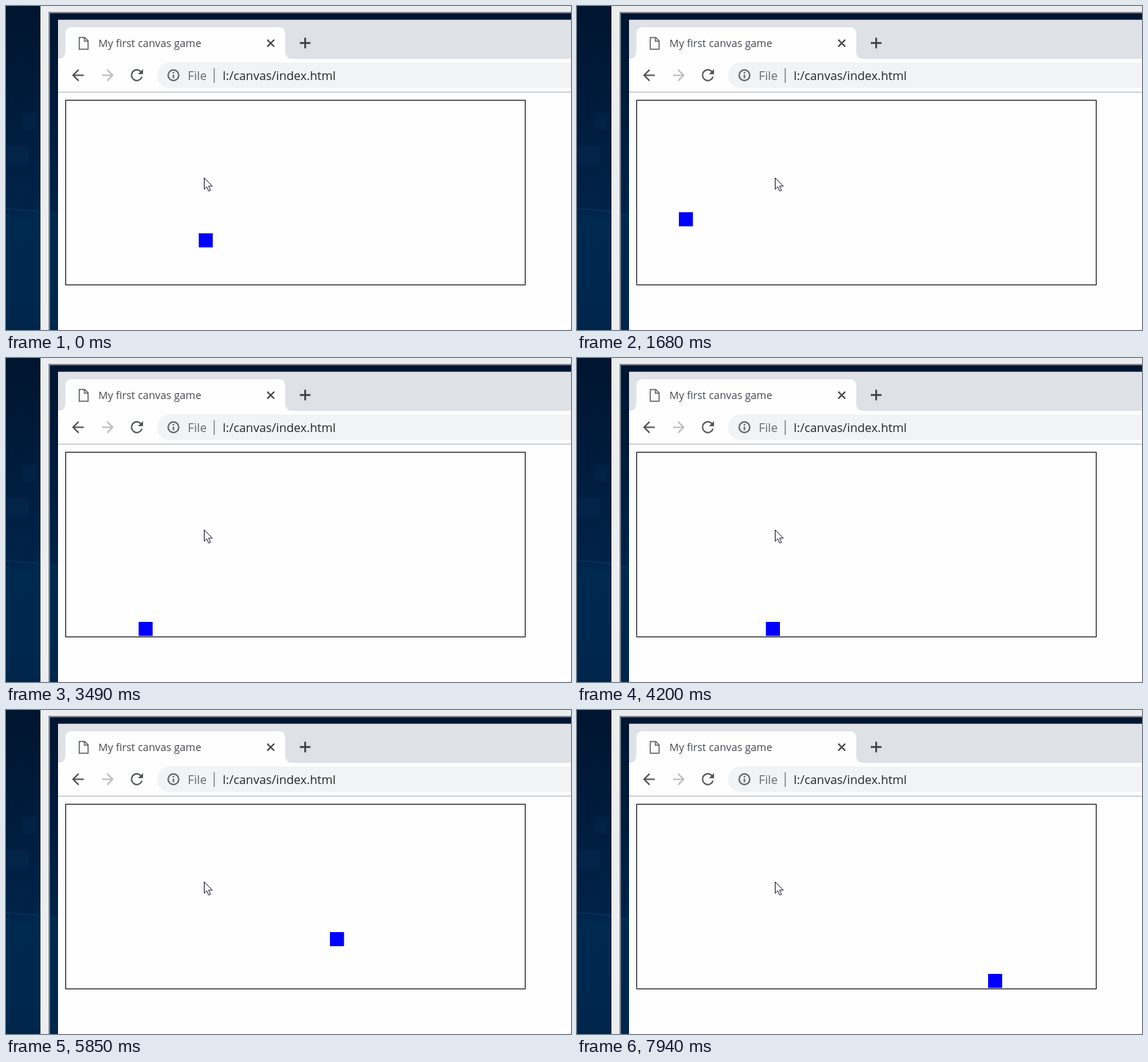
Animation, 771 px wide and 442 px high, one loop 8000 ms. Source, as an HTML page:

```html
<!DOCTYPE html>
<html lang="en">
<head>
<meta charset="utf-8">
<title>Canvas game</title>
<style>
  html, body { margin: 0; width: 100%; height: 100%; overflow: hidden; background: #fff; }
  svg { display: block; }
  text { font-family: "Open Sans", "Noto Sans", sans-serif; }
  .icon { fill: none; stroke: #5f6368; stroke-width: 2; }
</style>
</head>
<body>
<svg width="771" height="442" viewBox="0 0 771 442">
  <defs>
    <linearGradient id="night" x2="0" y2="1">
      <stop offset="0" stop-color="#001530"/>
      <stop offset=".3" stop-color="#001b3b"/>
      <stop offset=".62" stop-color="#002348"/>
      <stop offset=".66" stop-color="#00294f"/>
      <stop offset="1" stop-color="#00264c"/>
    </linearGradient>
  </defs>

  <!-- desktop and outer window frame -->
  <rect width="771" height="442" fill="url(#night)"/>
  <g fill="#08305a" opacity=".3">
    <rect x="2" y="191" width="29" height="27"/>
    <rect x="23" y="146" width="18" height="22"/>
  </g>
  <path d="M0 277Q40 277 71 287" fill="none" stroke="#0a3d6c" stroke-width="2" opacity=".5"/>
  <path d="M47 442V0H771V8H58V442Z" fill="#ebedef"/>
  <path d="M59 442V9H771" fill="none" stroke="#7d8792" stroke-width="2"/>

  <!-- browser -->
  <rect x="71" y="18" width="700" height="424" fill="#fefefe"/>
  <rect x="71" y="18" width="700" height="54" fill="#dee1e6"/>
  <rect x="71" y="18" width="700" height="1" fill="#6b2c80"/>
  <path d="M71 72Q81 72 81 62V38Q81 29 90 29H372Q381 29 381 38V62Q381 72 391 72Z" fill="#fefefe"/>
  <path d="M771 77H223.5a17.5 17.5 0 0 0 0 35H771Z" fill="#f1f3f4"/>
  <rect x="71" y="117" width="700" height="1" fill="#b4b5b7"/>

  <g class="icon">
    <path d="M100 43H107.500L112 47.500V59H100ZM107 43V48H112" stroke-width="1.5"/>
    <path d="M356.500 46L366 55.500M366 46L356.500 55.500" stroke="#45494d"/>
    <path d="M401 50.500H415.500M408.250 43.250V57.750" stroke="#3c4043" stroke-width="2.4"/>
    <path id="arrow" d="M106 94.500H92M99 87L91.500 94.500L99 102" stroke="#505458"/>
    <path d="M131 94.500H145M138 87L145.500 94.500L138 102" stroke="#babcbe"/>
    <path d="M184 89.500A7.300 7.300 0 1 0 185.500 96.500" stroke="#505458"/>
    <path d="M187 86V93H180Z" fill="#505458" stroke="none"/>
    <circle cx="228.500" cy="94.500" r="7.200"/>
    <path d="M228.500 93.500V98.500M228.500 90V92"/>
  </g>
  <rect x="283.500" y="85" width="1.300" height="20" fill="#74787c"/>
  <text x="126" y="56" font-size="14.350" fill="#46494d">My first canvas game</text>
  <text x="248" y="101" font-size="16.400" fill="#686c70">File</text>
  <text x="295.500" y="101" font-size="16.400" fill="#25272a">I:/canvas/index.html</text>

  <!-- game -->
  <rect x="81.500" y="128.500" width="627" height="252" fill="none" stroke="#000"/>
  <rect id="player" width="19.200" height="19.200" fill="#00f"/>
  <path d="M270.500 234.500V250L274 246.700L276.600 252.500L279 251.400L276.500 245.800H281.500Z"
        fill="#fff" stroke="#1c2030"/>
</svg>
<script>
  const LOOP = 8000, STEP = 139.46, FIRST = 130;
  const GROUND = 360, HEIGHT = 78.7, FLIGHT = 4.965;
  // [step, x]: the square runs at constant speed between these points
  const run = [[0, 263], [7.97, 139], [16, 139], [18.8, 96], [19.47, 96],
               [50.72, 576], [56, 576], [57, 561]];
  // steps at which a jump starts
  const jumps = [-0.98, 4.15, 9.5, 30.89, 35.855, 40.82, 45.785, 51.77];
  const player = document.getElementById('player');

  function xAt(s) {
    const i = Math.max(1, run.findIndex(p => p[0] >= s));
    const [a, xa] = run[i - 1], [b, xb] = run[i];
    return xa + (xb - xa) * (s - a) / (b - a);
  }

  function yAt(s) {
    const start = jumps.find(j => s >= j && s < j + FLIGHT);
    if (start === undefined) return GROUND;
    const u = (s - start) / FLIGHT;
    return GROUND - 4 * HEIGHT * u * (1 - u);
  }

  function draw(now) {
    const t = now % LOOP;
    const s = Math.min(57, Math.max(0, Math.floor((t - FIRST) / STEP + 1.05)));
    player.setAttribute('x', xAt(s));
    player.setAttribute('y', yAt(s));
    requestAnimationFrame(draw);
  }
  draw(0);
</script>
</body>
</html>
```
